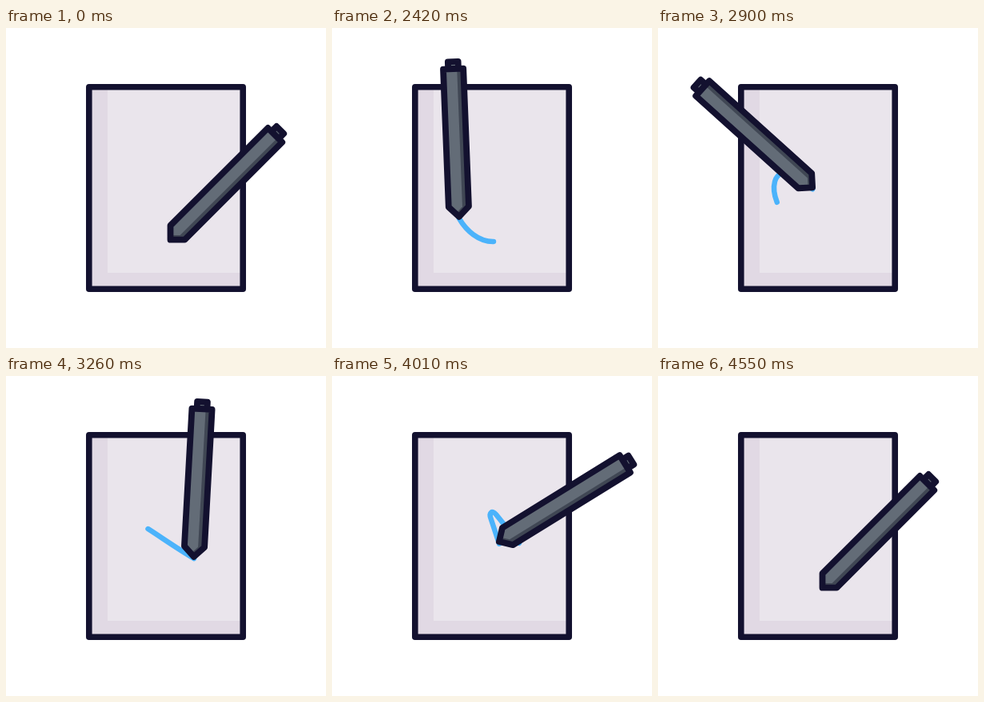
Recreate the animation shown at these times as an HTML page with a canvas. Size 400 by 400 pixels, loop 4.64 s.

```html
<!DOCTYPE html>
<html lang="en">
<head>
<meta charset="utf-8">
<title>Pen and paper</title>
<style>
  html, body { margin: 0; width: 100%; height: 100%; overflow: hidden; background: #fff; }
  canvas { display: block; width: 400px; height: 400px; }
  svg { position: absolute; }
</style>
</head>
<body>
<canvas id="stage" width="400" height="400"></canvas>
<svg width="0" height="0"><path id="route" d="
  M205.5 264.7 C185 267 168 252 158.5 235.3
  C150 220 142 205 146 190 C149 179 158 177 166 182
  C185 193 212 213 237 227.2 C246 231 245 220 238 212
  L205 171 C200 165 196 169 198.5 176
  L210.8 213 C215 231 217 262 205.5 264.7"/></svg>
<script>
const ctx = document.getElementById('stage').getContext('2d');
const route = document.getElementById('route');
const trail = new Path2D(route.getAttribute('d'));

const LOOP = 4640, START = 2000, END = 4550, STEP = 30;
const FIRST_CHANGE = START + STEP;
const INK = '#13112f', PAPER = '#eae5ec', PAPER_SHADE = '#e1d9e4';
const PEN = '#636c77', PEN_SHADE = '#404754', TRAIL = '#4bb3fb';

// Time and distance travelled along the route
const pace = [
  [START, 0], [2420, 58], [2540, 102], [2900, 165], [3260, 214.5],
  [3620, 294], [4010, 340], [4160, 372], [END, route.getTotalLength()]
];

// Time and tilt in degrees at the end of each swing
const swings = [[START, 45], [2840, -49.5], [3720, 63.5], [END, 45]];

function locate(keys, t) {
  let i = 0;
  while (i < keys.length - 2 && t > keys[i + 1][0]) i++;
  const span = keys[i + 1][0] - keys[i][0];
  const u = Math.min(1, Math.max(0, (t - keys[i][0]) / span));
  return { i, span, u };
}

function slope(i) {
  const a = pace[i - 1], b = pace[i + 1];
  return a && b ? (b[1] - a[1]) / (b[0] - a[0]) : 0;
}

const smooth = u => u * u * (3 - 2 * u);
const mix = (a, b, u) => a + (b - a) * u;

function distance(t) {
  const { i, span, u } = locate(pace, t), v = 1 - u;
  return mix(pace[i][1], pace[i + 1][1], smooth(u))
    + span * u * v * (v * slope(i) - u * slope(i + 1));
}

function tilt(t) {
  const { i, u } = locate(swings, t);
  return mix(swings[i][1], swings[i + 1][1], smooth(u)) * Math.PI / 180;
}

// The tail falls further behind the pen, then catches up at the end
function tailLag(t) {
  return Math.min(265 + 0.17 * (t - START), 1.5 * (END - t));
}

const sheet = new Path2D();
sheet.rect(103.8, 73.8, 192.4, 252.4);

// Pen with its tip at the origin, pointing down
const body = new Path2D('M0 0 L12.6 -12.6 V-185 H-12.6 V-12.6 Z');
const cap = new Path2D('M-6.4 -185 V-194 H6.4 V-185 Z');

function strokeWith(path, color, width) {
  ctx.strokeStyle = color;
  ctx.lineWidth = width;
  ctx.stroke(path);
}

function fillWith(path, color) {
  ctx.fillStyle = color;
  ctx.fill(path);
}

function drawPaper() {
  fillWith(sheet, PAPER_SHADE);
  ctx.fillStyle = PAPER;
  ctx.fillRect(127, 74, 169, 232);
  strokeWith(sheet, INK, 7.6);
}

function drawTrail(from, to) {
  if (to - from < 1) return;
  ctx.save();
  ctx.translate(0, 2);
  ctx.setLineDash([to - from, 1000]);
  ctx.lineDashOffset = -from;
  strokeWith(trail, TRAIL, 6.5);
  ctx.restore();
}

function drawPen(t) {
  const tip = route.getPointAtLength(distance(t));
  ctx.save();
  ctx.translate(tip.x, tip.y);
  ctx.rotate(tilt(t));
  fillWith(cap, PEN);
  strokeWith(cap, INK, 7.8);
  fillWith(body, PEN_SHADE);
  ctx.save();
  ctx.clip(body);
  ctx.translate(-8, 0);
  fillWith(body, PEN);
  ctx.restore();
  strokeWith(body, INK, 7.8);
  ctx.restore();
}

function draw(time) {
  const stepped = FIRST_CHANGE + Math.floor((time - FIRST_CHANGE) / STEP) * STEP;
  const t = time < FIRST_CHANGE ? END : Math.min(stepped, END);
  ctx.fillStyle = '#fff';
  ctx.fillRect(0, 0, 400, 400);
  ctx.lineJoin = ctx.lineCap = 'round';
  drawPaper();
  drawTrail(distance(t - tailLag(t)), distance(t));
  drawPen(t);
}

const origin = performance.now();
function tick() {
  draw((performance.now() - origin) % LOOP);
  requestAnimationFrame(tick);
}
tick();
</script>
</body>
</html>
```
